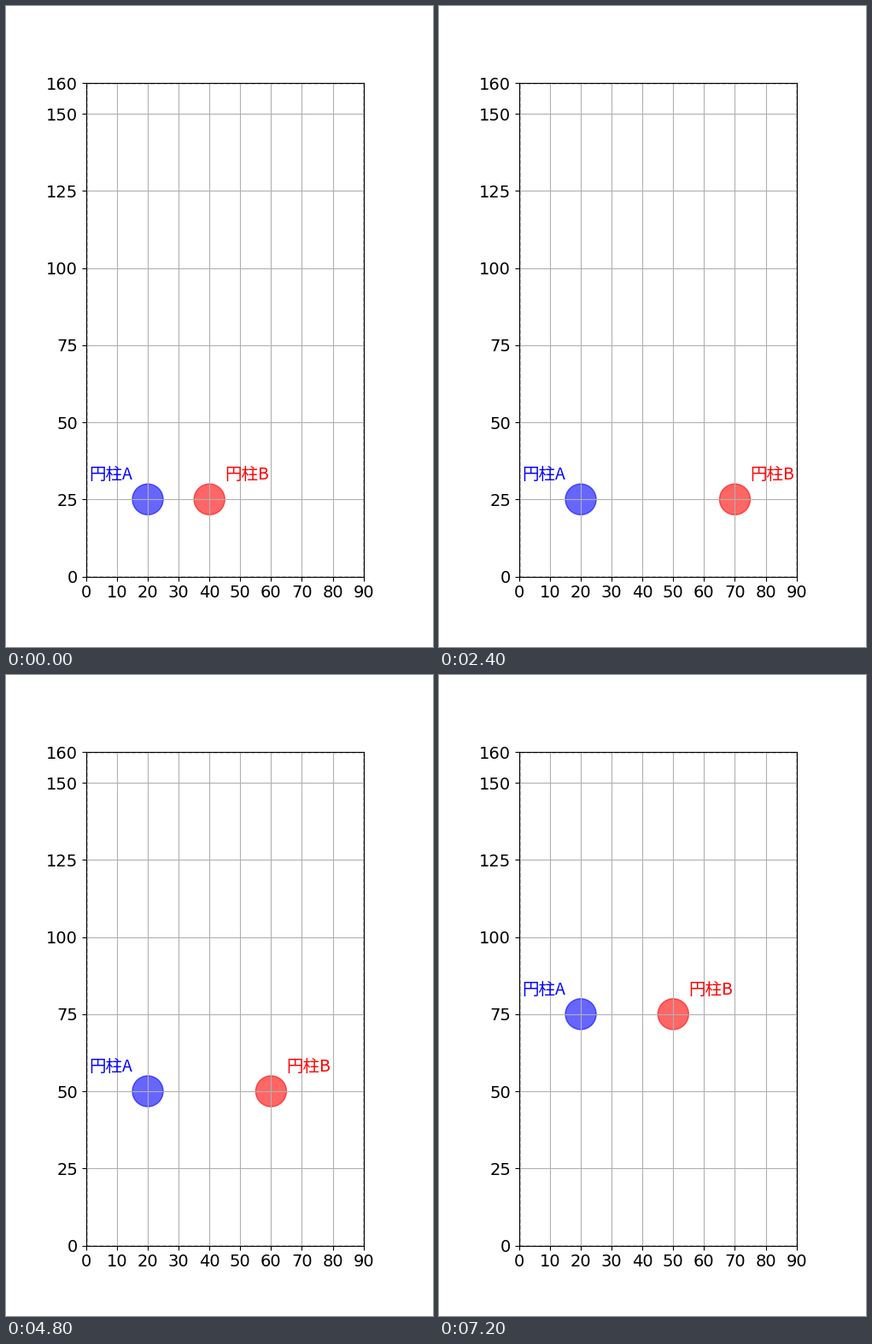
Recreate the animation shown at these times as a matplotlib script. Size 500 by 750 pixels, loop 8000 ms.

```python
import matplotlib.pyplot as plt
from matplotlib.animation import FuncAnimation
from matplotlib.patches import Circle, Rectangle

RADIUS = 5
ROW_STEP = 25
B_COLUMNS = (40, 50, 60, 70)
A_COLUMN = 20
FRAMES = 10
INTERVAL = 800

fig, ax = plt.subplots(figsize=(5, 7.5), dpi=100)
fig.subplots_adjust(left=0.125, right=0.9, bottom=0.11, top=0.88)
ax.set_aspect("equal")
ax.set_xlim(0, 90)
ax.set_ylim(0, 160)
ax.set_xticks(range(0, 91, 10))
ax.set_yticks([*range(0, 151, 25), 160])
ax.tick_params(labelsize=14, labelfontfamily="DejaVu Sans")
ax.grid(True)
ax.add_patch(Rectangle((0, 0), 90, 160, fill=False, ls="--", lw=1))


def add_cylinder(name, color, ha):
    circle = ax.add_patch(Circle((0, 0), RADIUS, color=color, alpha=0.6))
    label = ax.text(0, 0, name, color=color, fontsize=14, ha=ha,
                    va="bottom", fontfamily="Noto Sans CJK JP")
    return circle, label


def place(cylinder, x, y, side):
    circle, label = cylinder
    circle.center = x, y
    label.set_position((x + side * RADIUS, y + RADIUS))


cylinder_a = add_cylinder("円柱A", "blue", "right")
cylinder_b = add_cylinder("円柱B", "red", "left")


def update(i):
    # B scans along a row, then both move up to the next one
    row, column = divmod(i, len(B_COLUMNS))
    y = ROW_STEP * (row + 1)
    place(cylinder_a, A_COLUMN, y, -1)
    place(cylinder_b, B_COLUMNS[column], y, 1)
    return *cylinder_a, *cylinder_b


anim = FuncAnimation(fig, update, frames=FRAMES, interval=INTERVAL,
                     repeat=True, repeat_delay=0)
plt.show()
```
